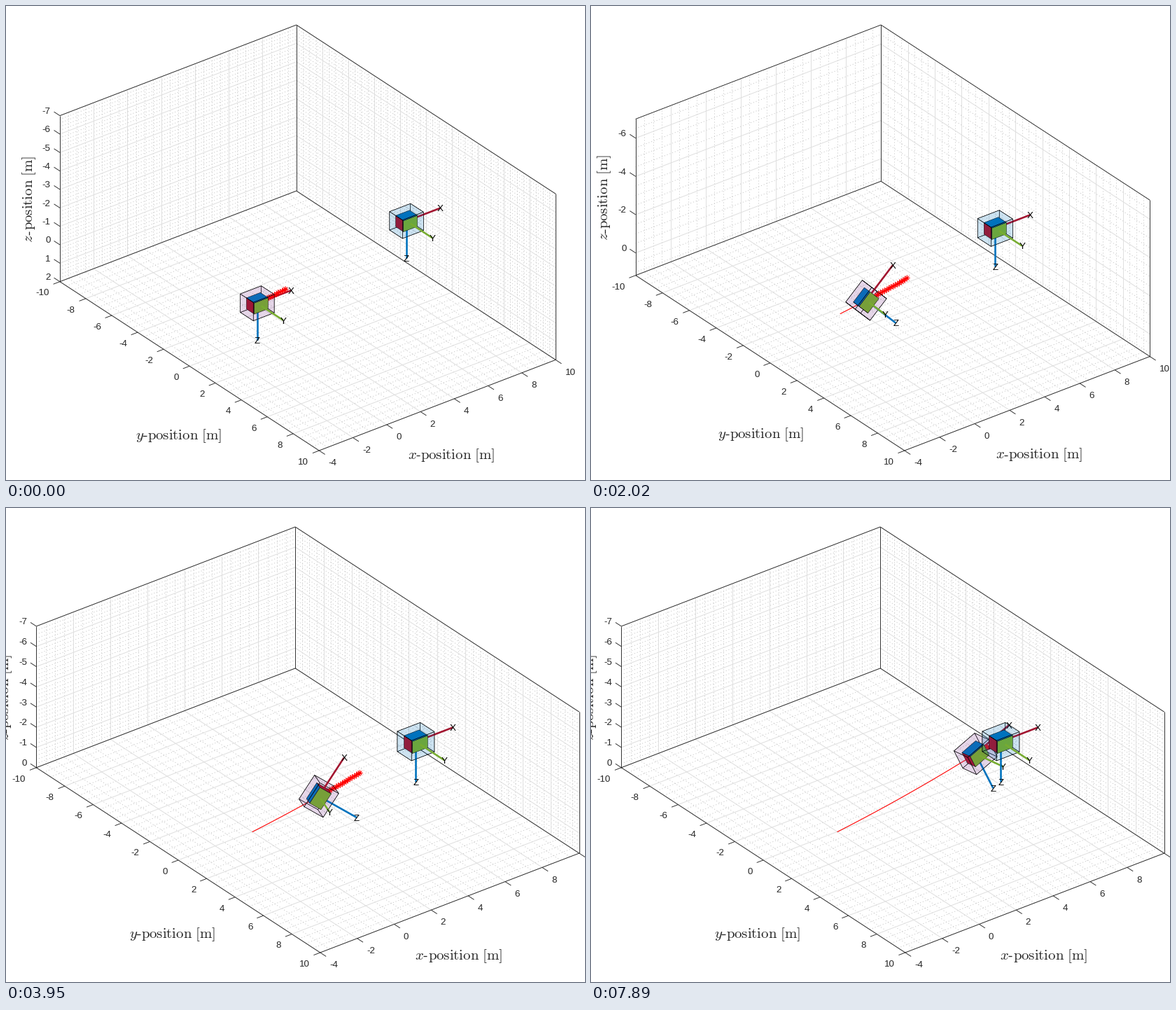
A matplotlib script for the animation above (7.99 s loop, 827x677 px).

```python
import itertools

import numpy as np
import matplotlib.pyplot as plt
from matplotlib.animation import FuncAnimation
from matplotlib.collections import LineCollection
from matplotlib.colors import to_rgba
from matplotlib.lines import Line2D
from matplotlib.patches import Polygon

plt.rcParams["font.family"] = "Liberation Sans"
plt.rcParams["mathtext.fontset"] = "cm"

W, H, DPI = 827, 677, 100
FRAMES, STEP = 94, 85
PX = 72 / DPI
INK = "#262626"
AXIS_COLORS = ["#A2142F", "#77AC30", "#0072BD"]

# Orthographic view: azimuth -37.5, elevation 30; U is right, V is down
SA, CA = np.sin(np.radians(37.5)), np.cos(np.radians(37.5))
U = np.array([CA, SA, 0])
V = np.array([-SA / 2, CA / 2, np.sqrt(0.75)])
ORIGIN = np.array([431, 27])
XMIN, XMAX, YMIN, YMAX, ZTOP = -4, 10, -10, 10, -7

# View-plane places, in metres
START = np.array([-2.37, 13.075])
GOAL = np.array([4.637, 9.21])
DOCK = 6.42
HORIZON = 2.15

OUTER = np.array([1.24, 1, 1])
INNER = np.array([.82, .6, .6])

fig = plt.figure(figsize=(W / DPI, H / DPI), dpi=DPI, facecolor="white")
ax = fig.add_axes([0, 0, 1, 1])
parts = []
order = itertools.count()


def progress(t):
    """Advance of the chaser: soft start, slow braking, stop at the dock."""
    return np.minimum(1.038 * (np.hypot(t, 1) - 1) - 0.02 * t**2, DOCK)


def path(a):
    """Slightly bowed approach line, by advance to the right."""
    a = np.asarray(a)
    drop = -0.565 * a + 0.0094 * a * (5.97 - a)
    return START + np.stack([a, drop], axis=-1)


def attitude(t):
    """Right and down parts of the body axes: nose up, hold, level out."""
    def part(t0, t1):
        return np.clip((t - t0) / (t1 - t0), 0, 1)

    back = part(5, 7.89) ** 2
    roll_in = part(0, 2.05)
    pitch = 53 * np.sin(np.pi / 2 * part(0, 3.2)) - 33 * back
    roll = -16.5 * roll_in**2 * (5.3 * roll_in - 4.3) + 8 * back
    yaw = 11 * part(0, 2.8) ** 3 - 14 * back
    (cp, cr, cy), (sp, sr, sy) = (f(np.radians([pitch, roll, yaw]))
                                  for f in (np.cos, np.sin))
    rot = (np.array([[cy, -sy, 0], [sy, cy, 0], [0, 0, 1]])
           @ np.array([[cp, 0, sp], [0, 1, 0], [-sp, 0, cp]])
           @ np.array([[1, 0, 0], [0, cr, -sr], [0, sr, cr]]))
    return U @ rot, V @ rot


def put(artist):
    artist.set_zorder(next(order))
    parts.append(artist)
    return artist


def line(pts, color, width, **kw):
    x, y = np.transpose(pts)
    put(ax.add_line(Line2D(x, y, color=color, lw=width * PX, **kw)))


def segments(segs, color, width, style="-"):
    put(ax.add_collection(LineCollection(
        segs, colors=color, linewidths=width * PX, linestyles=style),
        autolim=False))


def quad(pts, face):
    put(ax.add_patch(Polygon(pts, fc=face, ec="black", lw=0.5 * PX,
                             joinstyle="round")))


def text(x, y, s, ha="center", color=INK):
    put(ax.text(x, y + 4.8, s, ha=ha, va="baseline", color=color,
                size=13.33 * PX))


def axis_name(x, y, letter, up=False):
    """Centred '<letter>-position [m]'; mathtext has no hyphen, so draw one."""
    em = 20.8
    d = np.array([0, -1]) if up else np.array([1, 0])
    n = np.array([1, 0]) if up else np.array([0, 1])
    start = np.array([x, y]) - 3.0 * em * d + 0.25 * em * n
    gap = 0.57 if letter == "x" else 0.5
    kw = dict(ha="left", va="baseline", rotation=90 if up else 0,
              rotation_mode="anchor", size=em * PX, color=INK)
    put(ax.text(*start, f"${letter}$", **kw))
    mid = start - 0.216 * em * n
    line([mid + (gap + .01) * em * d, mid + (gap + .27) * em * d], INK, 1.3,
         solid_capstyle="butt")
    put(ax.text(*(start + (gap + .33) * em * d),
                r"$\mathrm{position\ [m]}$", **kw))


def ticks(lo, hi, major, minor):
    n = np.arange(np.ceil(lo / minor - 1e-6), np.floor(hi / minor + 1e-6) + 1)
    per = round(major / minor)
    return n[n % per == 0] * minor, n[n % per != 0] * minor


def draw_axes(s, zb):
    def P(x, y, z):
        return ORIGIN + s * np.array([
            CA * (x - 3) + SA * y,
            V[0] * (x - 10) + V[1] * (y + 10) + V[2] * (z - ZTOP)])

    def grid(xs, ys, zs):
        segs = []
        for x in xs:
            c = P(x, YMIN, zb)
            segs += [(P(x, YMAX, zb), c), (c, P(x, YMIN, ZTOP))]
        for y in ys:
            c = P(XMAX, y, zb)
            segs += [(P(XMIN, y, zb), c), (c, P(XMAX, y, ZTOP))]
        for z in zs:
            c = P(XMAX, YMIN, z)
            segs += [(P(XMIN, YMIN, z), c), (c, P(XMAX, YMAX, z))]
        return segs

    x1, x2 = ticks(XMIN, XMAX, 2, .5)
    y1, y2 = ticks(YMIN, YMAX, 2, .5)
    z1, z2 = ticks(ZTOP, zb, *((2, .5) if 1.0 < zb < 1.5 else (1, .2)))
    segments(grid(x2, y2, z2), "#c2c2c2", 1, (0, (1, 3)))
    segments(grid(x1, y1, z1), "#dfdfdf", 1)

    left, front = P(XMIN, YMIN, zb), P(XMIN, YMAX, zb)
    right, back = P(XMAX, YMAX, zb), P(XMAX, YMIN, zb)
    tops = [P(XMIN, YMIN, ZTOP), P(XMAX, YMIN, ZTOP), P(XMAX, YMAX, ZTOP)]
    edges = [(left, front), (front, right), (right, back), (back, left),
             (tops[0], tops[1]), (tops[1], tops[2]),
             (left, tops[0]), (back, tops[1]), (right, tops[2])]

    dx = 10 * np.array([U[0], V[0]]) / np.hypot(U[0], V[0])
    dy = 10 * np.array([U[1], V[1]]) / np.hypot(U[1], V[1])
    for v in x1:
        p = P(v, YMAX, zb)
        edges.append((p, p + dy))
        text(p[0] + 13.5, p[1] + 16.5, f"{v:.0f}", "left")
    for v in y1:
        p = P(XMIN, v, zb)
        edges.append((p, p - dx))
        text(p[0] - 15.1, p[1] + 15, f"{v:.0f}", "right")
    for v in z1:
        p = P(XMIN, YMIN, v)
        edges.append((p, p - dy))
        text(p[0] - 13.2, p[1] - 7.5, f"{v + 0:.0f}", "right")
    segments(edges, INK, 0.9)

    grow = s - 30.42
    axis_name(636 + 3.6 * grow, 641.7 - 0.7 * grow, "x")
    axis_name(247 - 3.1 * grow, 613.7 - 1.75 * grow, "y")
    axis_name(left[0] - 44.5, (left[1] + tops[0][1]) / 2, "z", up=True)


def faces(size):
    """Yield axis, side and corners of each box face."""
    for i, side in itertools.product(range(3), (-1, 1)):
        j, k = [a for a in range(3) if a != i]
        corners = np.zeros((4, 3))
        corners[:, i] = side
        corners[:, j] = [-1, 1, 1, -1]
        corners[:, k] = [-1, -1, 1, 1]
        yield i, side, corners * size / 2


def draw_body(centre, u, v, s, color, stars=None):
    away = np.cross(u, v)
    frame = np.column_stack([u, v]) * s

    def shell(front):
        for i, side, c in faces(OUTER):
            if (side * away[i] < 0) == front:
                quad(centre + c @ frame, to_rgba(color, 0.1))

    def arrows(front):
        for i in range(3):
            if (away[i] < 0) == front:
                line([centre + INNER[i] / 2 * frame[i], centre + 2 * frame[i]],
                     AXIS_COLORS[i], 2.6, solid_capstyle="butt")

    shell(False)
    arrows(False)
    if stars is not None:
        line(stars, "red", 0.8, ls="none", marker=(8, 2, 0),
             markersize=8 * PX, markeredgewidth=0.7 * PX)
    for i, side, c in faces(INNER):
        if side * away[i] < 0:
            quad(centre + c @ frame, AXIS_COLORS[i])
    shell(True)
    arrows(True)
    for name, tip in zip("XYZ", centre + 2 * frame):
        text(*tip, name, color="black")


def draw(n):
    global order
    order = itertools.count()
    for a in parts:
        a.remove()
    parts.clear()

    t = n * STEP / 1000
    gone = progress(t)
    # The floor rises with the chaser's advance until it reaches zero
    zb = max(0.0, 2 - 0.71 * float(gone))
    s = 608 / (-14 * V[0] + 20 * V[1] + V[2] * (zb - ZTOP))

    def screen(p):
        return ORIGIN + s * p

    draw_axes(s, zb)
    line(screen(path(np.linspace(0, gone, 40))), "red", 1.1)
    ahead = progress(t + HORIZON * np.linspace(0.05, 1, 20))
    draw_body(screen(path(gone)), *attitude(t), s, "#7E2F8E",
              screen(path(ahead)))
    draw_body(screen(GOAL), U, V, s, "#0072BD")
    return parts


ax.set_xlim(0, W)
ax.set_ylim(H, 0)
ax.axis("off")

anim = FuncAnimation(fig, draw, frames=FRAMES, interval=STEP,
                     init_func=lambda: draw(0), repeat=True, repeat_delay=0)
plt.show()
```
